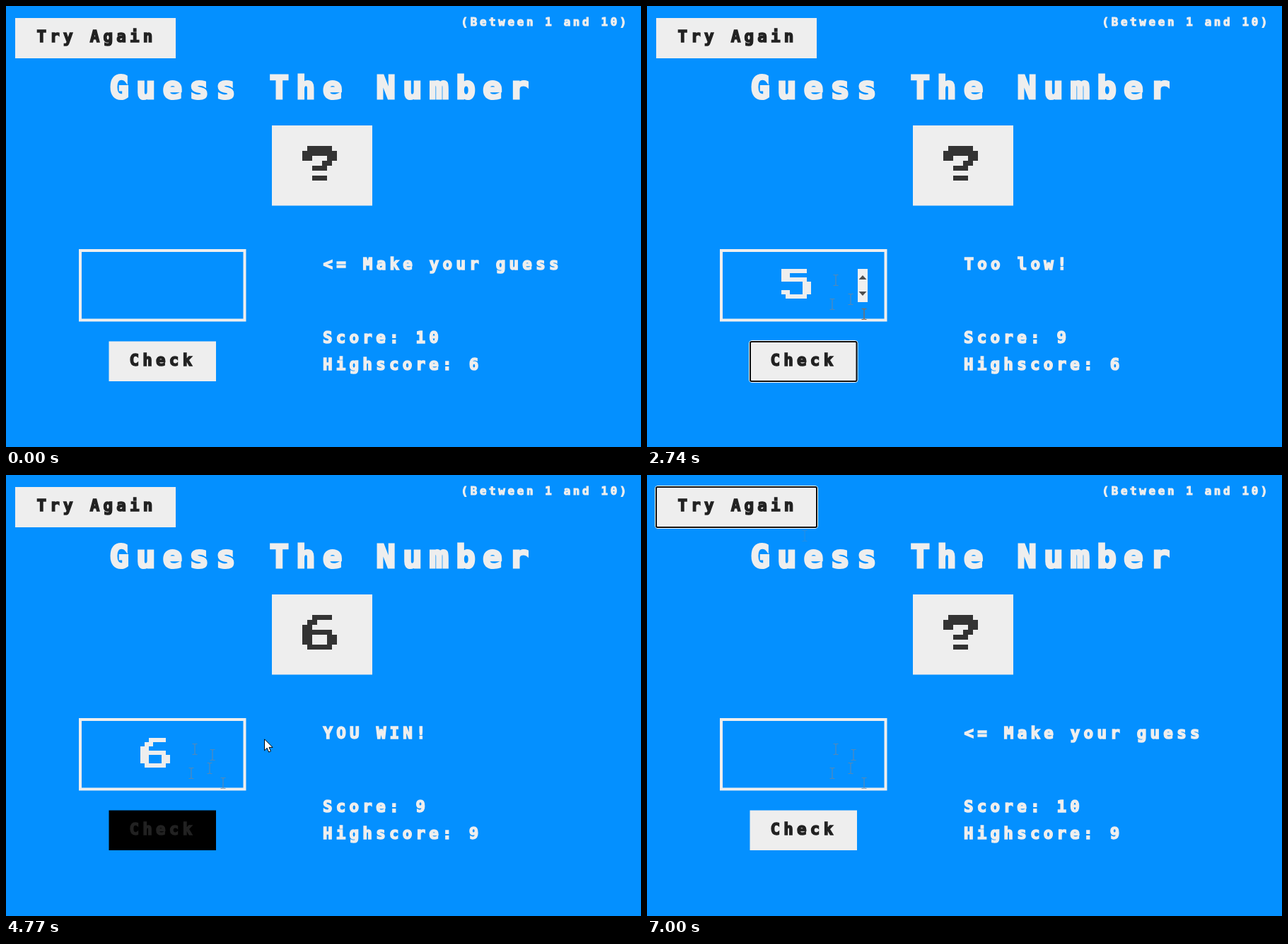
An HTML page for the animation above (7930 ms loop, 898 px wide and 624 px high).

```html
<!DOCTYPE html>
<html lang="en">
<head>
<meta charset="utf-8">
<title>Guess The Number</title>
<style>
  html, body { margin: 0; width: 100%; height: 100%; overflow: hidden; background: #0490ff; }
  svg { display: block; width: 898px; height: 624px; }
  text { font-family: "DejaVu Sans Mono", monospace; font-weight: bold; white-space: pre; }
</style>
</head>
<body>
<svg id="stage" viewBox="0 0 898 624"></svg>
<script>
const LOOP = 7930;
const STEP = 76; // time between two pointer positions
const LIGHT = '#eee', DARK = '#222', HOVER = '#ccc';
const stage = document.getElementById('stage');

function add(tag, attrs, parent = stage) {
  const el = document.createElementNS('http://www.w3.org/2000/svg', tag);
  set(el, attrs);
  parent.appendChild(el);
  return el;
}

function set(el, attrs) {
  for (const key in attrs) el.setAttribute(key, attrs[key]);
}

function show(el, visible) {
  el.setAttribute('visibility', visible ? 'visible' : 'hidden');
}

function moveTo(el, { x, y }) {
  set(el, { transform: `translate(${x} ${y})` });
}

function box(x, y, width, height, fill) {
  return add('rect', { x, y, width, height, fill });
}

// Heavy monospaced lettering: x is the left edge of the first cell, pitch the cell width.
function label(content, x, y, pitch, color = LIGHT) {
  const size = pitch * 1.2;
  const el = add('text', {
    x: x + pitch * 0.44 - size * 0.301, y: y - size * 0.03,
    fill: color, stroke: color, 'stroke-width': size * 0.07,
    'font-size': size, 'letter-spacing': pitch - size * 0.602
  });
  el.textContent = content;
  return el;
}

// Large block characters, stroked row by row on a 7 x 7 grid.
const BOWL = 'h2m3 0h2M0 5.5h2m3 0h2M1 6.5h5';
const BLOCKS = {
  '': '',
  '?': 'M1 .5h5M0 1.5h7M0 2.5h2m3 0h2M4 3.5h2M2 4.5h3M2 6.5h3',
  '5': 'M0 .5h6M0 1.5h2M0 2.5h6M5 3.5h2M5 4.5h2M0 5.5h2m3 0h2M1 6.5h5',
  '6': 'M2 .5h4M1 1.5h2M0 2.5h2M0 3.5h6M0 4.5' + BOWL
};

function blockChar(x, y, cell, stroke) {
  return add('path', {
    transform: `translate(${x} ${y}) scale(${cell})`,
    stroke, fill: 'none', 'shape-rendering': 'crispEdges'
  });
}

function setBlock(el, char) {
  set(el, { d: BLOCKS[char], 'aria-label': char });
}

function focusRing(x, y, width, height) {
  const ring = add('g', { fill: 'none' });
  const line = (inset, weight, stroke, rx) => add('rect', {
    x: x + inset, y: y + inset, width: width - 2 * inset, height: height - 2 * inset,
    rx, stroke, 'stroke-width': weight
  }, ring);
  line(0.5, 1, '#fff', 3.5);
  line(2, 2, '#101010', 2);
  return ring;
}

function iBeam(stroke, opacity = 1) {
  return add('path', {
    d: 'M-3.5-7.5h2.5l1 1 1-1h2.5M0-6.5v13M-3.5 7.5h2.5l1-1 1 1h2.5',
    fill: 'none', 'stroke-width': 1.2, stroke, opacity
  });
}

// Pointer legs: start, end and the place reached
const ENTRY = { x: 303, y: 540 };
const LEAVES = 7000;
const legs = [
  [380, 690, 288, 415], [770, 930, 267, 388],
  [1730, 1730, 262, 422], [1806, 1806, 241, 479],
  [2660, 2736, 307, 436], [2810, 2880, 307, 384],
  [3110, 3740, 258, 490], [3890, 4200, 292, 396], [4520, 4850, 375, 371],
  [5150, 5536, 223, 86], [5612, 5690, 196, 33], [6620, LEAVES, 888, 598]
].map(([start, end, x, y]) => ({ start, end, x, y }));

function pointerAt(t) {
  const i = legs.findLastIndex(leg => leg.start <= t);
  if (i < 0 || t >= LEAVES) return null;
  const leg = legs[i], from = legs[i - 1] || ENTRY;
  const count = Math.round((leg.end - leg.start) / STEP) + 1;
  const done = Math.min(1, (Math.floor((t - leg.start) / STEP) + 1) / count);
  const eased = 1 - (1 - done) ** 1.35;
  const mix = axis => from[axis] + (leg[axis] - from[axis]) * eased;
  return { x: mix('x'), y: mix('y') };
}

function inside(p, left, top, right, bottom) {
  return !!p && p.x >= left && p.x < right && p.y >= top && p.y < bottom;
}

function hoverAt(p) {
  if (inside(p, 298, 372, 312, 419)) return 'spinner';
  if (inside(p, 103, 344, 339, 447)) return 'input';
  if (inside(p, 146, 475, 297, 531)) return 'check';
  if (inside(p, 13, 17, 240, 74)) return 'tryAgain';
  return inside(p, 144, 80, 747, 140) ? 'title' : '';
}

function focusAt(t) {
  if (t >= 5920) return 'tryAgain';
  if (t >= 3830) return '';
  if (t >= 3030) return 'input';
  if (t >= 2280) return 'check';
  return t >= 1410 ? 'input' : '';
}

function cursorFor(hover, won) {
  if (hover === 'tryAgain' || (hover === 'check' && !won)) return 'hand';
  return hover === 'input' || hover === 'title' ? 'text' : 'arrow';
}

// Layout
box(0, 0, 898, 624, '#0490ff');
const tryButton = box(13, 17, 227, 57, LIGHT);
label('Try Again', 42, 52, 18.8, DARK);
label('(Between 1 and 10)', 642.5, 28, 13.2);
label('Guess The Number', 143.5, 132, 37.7);
box(376, 169, 142, 113.5, LIGHT);
const secret = blockChar(418.5, 197.5, 7.1, '#333');
add('rect', {
  x: 105, y: 346, width: 232.5, height: 98.5, fill: 'none', stroke: LIGHT, 'stroke-width': 4
});
const guess = blockChar(190, 372, 6, LIGHT);
const caret = box(213.5, 372, 1, 47, LIGHT);
const checkButton = box(145.5, 474.5, 151.5, 56.5, LIGHT);
label('Check', 173, 510, 18.8, DARK);
const message = label('', 447, 374, 18.8);
const score = label('', 446.5, 477.5, 18.8);
const highscore = label('', 446.5, 515.5, 18.8);

const spinner = add('g', {});
add('rect', { x: 298, y: 372, width: 14, height: 47, fill: '#f0f0f0' }, spinner);
add('path', { d: 'M299.5 387l5.5-6 5.5 6zM299.5 404l5.5 6 5.5-6z', fill: '#505050' }, spinner);

const rings = {
  input: focusRing(102, 343, 238, 104),
  check: focusRing(144, 473, 154.5, 60),
  tryAgain: focusRing(11, 15, 231, 61)
};

// The text pointer leaves a faint trace wherever a leg ends.
const traces = legs
  .filter(leg => cursorFor(hoverAt(leg)) === 'text')
  .map(leg => {
    const el = iBeam('#6f87a0', hoverAt(leg) === 'title' ? 0.3 : 0.75);
    moveTo(el, leg);
    return { el, since: leg.end + STEP };
  });

const outlined = { fill: '#fff', stroke: '#000', 'stroke-linejoin': 'round' };
const cursors = {
  arrow: add('path', { d: 'M0 0v16l3.7-3.5 2.4 5.7 2.8-1.2-2.4-5.5h5z', ...outlined }),
  text: iBeam('#8f6a50'),
  hand: add('path', {
    d: 'M-2 2q0-2 2-2t2 2v6l1-1q2.5-.5 3 1.5 2.5-.5 3 1.5 1.5 0 1.5 2v4l-2 4v2.5h-8v-2.5l-5.5-6q-1.5-2 0-3l3 2z',
    ...outlined
  })
};

function render(t) {
  const pointer = pointerAt(t);
  const hover = hoverAt(pointer);
  const focus = focusAt(t);
  const won = t >= 3830 && t < 5920;
  const missed = t >= 2280 && t < 3830;

  message.textContent = won ? 'YOU WIN!' : missed ? 'Too low!' : '<= Make your guess';
  score.textContent = 'Score: ' + (won || missed ? 9 : 10);
  highscore.textContent = 'Highscore: ' + (t >= 3830 ? 9 : 6);
  setBlock(secret, won ? '6' : '?');
  setBlock(guess, t < 1990 || t >= 5920 ? '' : t < 3030 ? '5' : '6');

  set(checkButton, { fill: won ? '#000' : hover === 'check' ? HOVER : LIGHT });
  set(tryButton, { fill: hover === 'tryAgain' ? HOVER : LIGHT });
  for (const name in rings) show(rings[name], name === focus);
  show(spinner, hover === 'input' || hover === 'spinner' || focus === 'input');
  show(caret, t >= 1410 && t < 1910);
  traces.forEach(({ el, since }) => show(el, t >= since));

  const cursor = pointer && cursorFor(hover, won);
  if (pointer) moveTo(cursors[cursor], pointer);
  for (const name in cursors) show(cursors[name], name === cursor);
}

const begin = performance.now();
function tick() {
  render((performance.now() - begin) % LOOP);
  requestAnimationFrame(tick);
}
tick();
</script>
</body>
</html>
```
